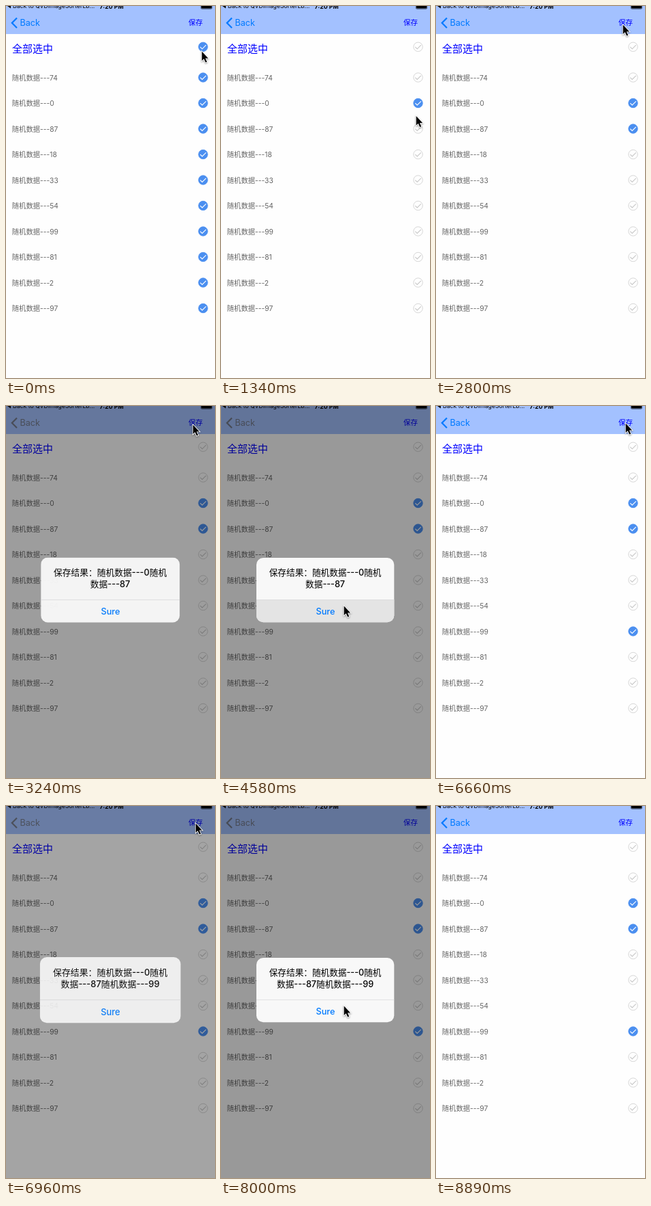
Animation, 307 px wide and 544 px high, one loop 9120 ms. Source, as an HTML page:

```html
<!DOCTYPE html>
<html lang="zh-CN">
<head>
<meta charset="utf-8">
<title>Multi-select list</title>
<style>
  html, body { margin: 0; width: 100%; height: 100%; overflow: hidden; background: #fefefe; }
  svg { display: block; width: 307px; height: 544px; }
  text { font-family: Inter, "Noto Sans CJK SC", "Noto Sans CJK", sans-serif; }
  .mid { text-anchor: middle; font-weight: 500; font-size: 12.65px; }
  .row { font-size: 10.3px; fill: #666; }
  .check path { fill: none; stroke-width: 1.1; }
  .check circle { fill: #fefefe; stroke: #d2d2d2; stroke-width: .9; }
  .check path { stroke: #c8c8c8; }
  .check.on circle { fill: #4b8ff0; stroke: #4b8ff0; }
  .check.on path { stroke: #fff; }
  #cursor { filter: drop-shadow(0 1px .8px rgba(0, 0, 0, .4)); }
</style>
</head>
<body>
<svg viewBox="0 0 307 544">
  <defs>
    <clipPath id="card"><rect x="52" y="222" width="202.3" height="94.2" rx="10"/></clipPath>
  </defs>
  <rect width="307" height="544" fill="#fefefe"/>
  <rect width="307" height="41" fill="#a3c1ff"/>
  <path d="M2 0L7 -3.5V3.5Z"/>
  <text x="10" y="3.2" font-size="8.7">Back to QVDImageSorterLb...</text>
  <text x="137.5" y="3.6" font-size="8.8" font-weight="700">7:20 PM</text>
  <rect x="286.3" y="-4" width="16.4" height="8.2" rx="1.6" fill="none" stroke="#000" stroke-width=".6"/>
  <rect x="287" y="-3" width="15" height="6.4" rx=".8"/>
  <g id="back">
    <path d="M16 17.5L8.8 24.8L16 32.1" fill="none" stroke="currentColor" stroke-width="2.2"/>
    <text x="20.4" y="29.2" font-size="12.7" fill="currentColor">Back</text>
  </g>
  <text x="268" y="28" font-size="10.5" fill="#00f">保存</text>
  <text x="9" y="68.3" font-size="15" fill="#00f">全部选中</text>
  <g id="list"></g>
  <rect id="dim" width="307" height="544"/>
  <g id="alert">
    <g clip-path="url(#card)">
      <rect x="52" y="222" width="203" height="95" fill="#f8f8f8"/>
      <rect id="pressed" x="52" y="283" width="203" height="34" fill="#e4e4e4"/>
      <rect x="52" y="283" width="203" height=".7" fill="#d8d8da"/>
    </g>
    <text class="mid" x="153.1" y="248.3">保存结果：随机数据---0随机</text>
    <text class="mid" x="153.1" y="265.1" id="result"></text>
    <text class="mid" x="153.5" y="304.9" fill="#007aff">Sure</text>
  </g>
  <path id="cursor" d="M0 0V13.4L3 10.7L5.4 16L7.5 15.1L5.2 9.9H9.4Z"
        stroke="#fff" stroke-width="1.7" paint-order="stroke"/>
</svg>
<script>
const LOOP = 9120, STEP = 148.1, LEAD = 25;
const VALUES = [74, 0, 87, 18, 33, 54, 99, 81, 2, 97];
const CLEAR_STEP = 2;
const PICKED_AT = { 0: 7, 87: 11, 99: 40 };   // value: step of its tap
const ALERTS = [
  { open: 20.6, press: 31, close: 32.4, text: '数据---87' },
  { open: 46.04, press: 56, close: 57.2, text: '数据---87随机数据---99' }
];
// step, x, y of the pointer tip
const POINTER = [
  [0, 287, 66], [3, 287, 66], [6, 286, 142], [8, 286, 144], [10, 286, 177], [12, 286, 182],
  [13, 286, 180], [19, 274, 27], [22, 274, 27], [28, 180, 296], [29, 180, 292], [32, 180, 292],
  [37, 293, 320], [40, 293, 320], [45, 278, 25], [48, 278, 25], [54, 180, 292], [57, 180, 292],
  [60, 320, 210], [62, 320, 210]
];

const $ = id => document.getElementById(id);
const checkAt = y => `<g class="check" transform="translate(289.5 ${y})">
  <circle r="6.7"/><path d="M-4.2 .1L-1.3 3L4.3 -2.6"/></g>`;

$('list').innerHTML = checkAt(59.8) + VALUES.map((value, i) => {
  const y = 104.5 + 37.5 * i;
  return `<text class="row" x="8.8" y="${y + 4.2}">随机数据---${value}</text>` + checkAt(y);
}).join('');
const checks = [...document.querySelectorAll('.check')];

function pointerAt(step) {
  const i = POINTER.findIndex(key => key[0] > step);
  const [s0, x0, y0] = POINTER[i - 1], [s1, x1, y1] = POINTER[i];
  const u = (step - s0) / (s1 - s0), ease = u * u * (3 - 2 * u);
  return [x0 + (x1 - x0) * ease + 0.7, y0 + (y1 - y0) * ease + 0.6];
}

function drawAlert(step) {
  const alert = ALERTS.find(a => step >= a.open && step < a.close + 2.6);
  let shown = 0, scale = 1;
  if (alert) {
    const rest = Math.exp(-2.3 * (step - alert.open));
    const fade = step > alert.close ? Math.exp(-1.6 * (step - alert.close)) : 1;
    shown = (1 - rest) * fade;
    scale = 1 + 0.2 * rest;
    $('result').textContent = alert.text;
    $('pressed').style.opacity = step >= alert.press ? 1 : 0;
  }
  $('dim').style.opacity = 0.4 * shown;
  $('alert').style.opacity = shown;
  $('alert').setAttribute('transform',
    `translate(153.2 269.1) scale(${scale}) translate(-153.2 -269.1)`);
  $('back').style.color = alert && step < alert.close ? '#767d8e' : '#007aff';
}

function draw() {
  const step = Math.floor((performance.now() % LOOP + LEAD) / STEP);
  checks.forEach((check, i) =>
    check.classList.toggle('on', step < CLEAR_STEP || step >= PICKED_AT[VALUES[i - 1]]));
  drawAlert(step);
  $('cursor').setAttribute('transform', `translate(${pointerAt(step)})`);
  requestAnimationFrame(draw);
}
draw();
</script>
</body>
</html>
```
